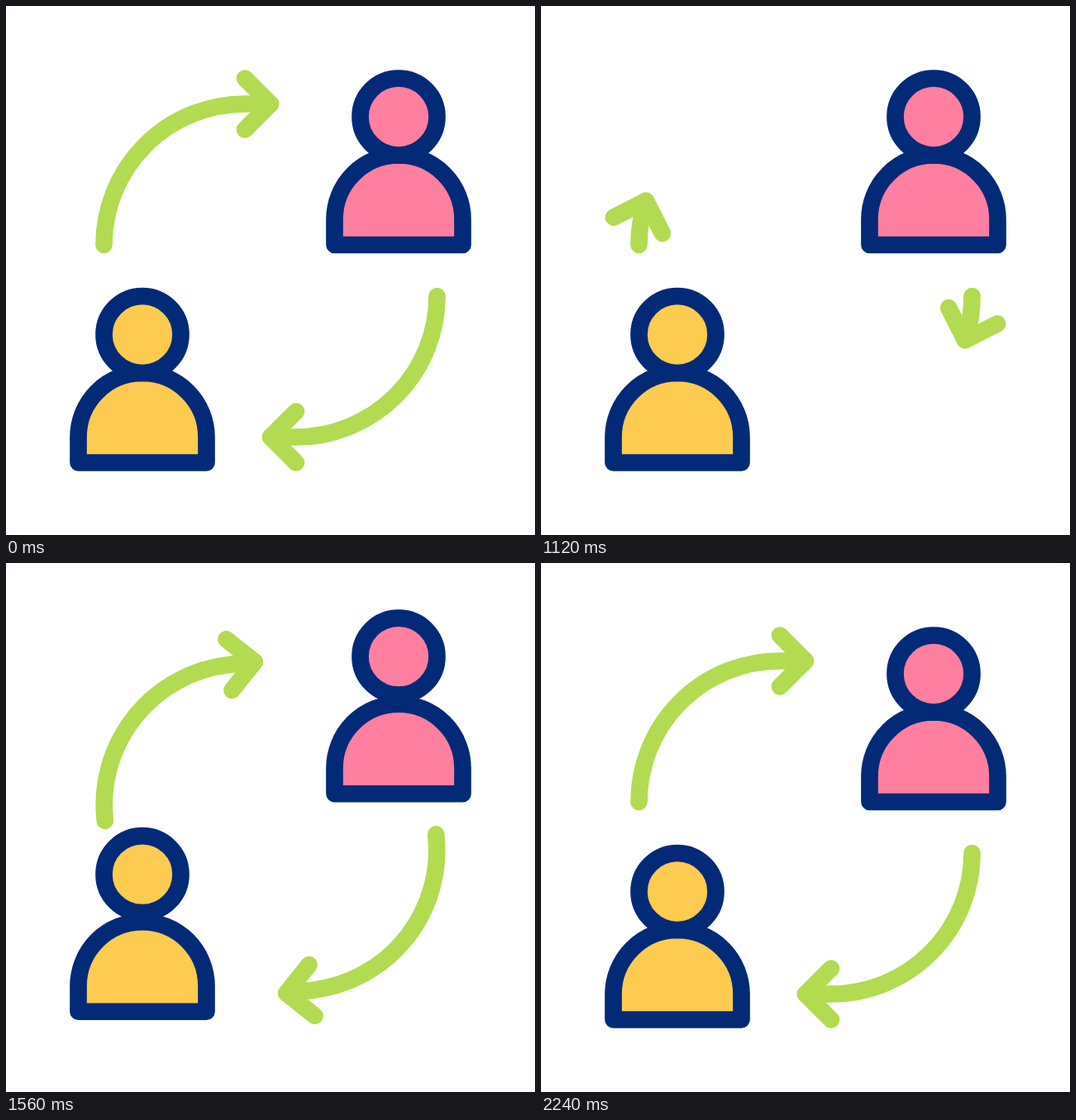
Write an HTML page with a canvas that moves like this. It is 640 by 640 pixels and loops after 2440 ms.

```html
<!DOCTYPE html>
<html lang="en">
<head>
<meta charset="utf-8">
<title>Two people swapping places</title>
<style>
  html, body { margin: 0; width: 100%; height: 100%; overflow: hidden; background: #fff; }
  canvas { display: block; width: 640px; height: 640px; }
</style>
</head>
<body>
<canvas id="stage" width="640" height="640"></canvas>
<script>
const ctx = document.getElementById('stage').getContext('2d');
const LOOP = 2440, STEP = 40;
const UNIT = 31 / 30;                 // pixels per drawing unit, origin at the centre
const RADIUS = 165, ARC = RADIUS * Math.PI / 2, LENGTH = ARC + 30;
const HEAD = 60 * Math.SQRT2;
const NAVY = '#032a77', PINK = '#ff7fa0', YELLOW = '#fdcb50', GREEN = '#b2db51';

// Keys are [time, value] pairs
const GROW = [[760, 0], [1120, .181], [1320, .575], [1440, .917], [1520, 1]];
const SWING = [[1440, 0], [1640, -10], [1720, -8.2], [1880, -1.2], [1960, .3], [2060, .6], [2240, 0]];
const LIFT = [[1280, 0], [1440, 5], [1600, 10], [1720, 10], [1880, 4.3], [1920, 3.1], [1960, 2.2], [2100, 0]];
const HOP = [[1440, 0], [1620, 14.5], [1720, 8], [1840, 0]];

const clamp = x => Math.min(1, Math.max(0, x));

// Smooth monotone curve through the keys, held outside them
function track(keys, t) {
  const last = keys.length - 1;
  if (t <= keys[0][0]) return keys[0][1];
  if (t >= keys[last][0]) return keys[last][1];
  const i = keys.findIndex(k => k[0] > t) - 1;
  const slope = j => (keys[j + 1][1] - keys[j][1]) / (keys[j + 1][0] - keys[j][0]);
  const tangent = j => {
    if (j === 0 || j === last) return 0;
    const a = slope(j - 1), b = slope(j);
    return a * b <= 0 ? 0 : 2 * a * b / (a + b);
  };
  const [t0, v0] = keys[i], [t1, v1] = keys[i + 1];
  const d = t1 - t0, s = (t - t0) / d, r = 1 - s;
  return v0 * (1 + 2 * s) * r * r + v1 * (3 - 2 * s) * s * s
    + d * s * r * (tangent(i) * r - tangent(i + 1) * s);
}

function person(x, y, fill, lift, hop) {
  ctx.save();
  ctx.translate(x, y - lift);
  ctx.strokeStyle = NAVY;
  ctx.fillStyle = fill;
  ctx.beginPath();
  ctx.moveTo(-75, 150);
  ctx.arc(0, 120, 75, Math.PI, 0);
  ctx.lineTo(75, 150);
  ctx.closePath();
  ctx.fill();
  ctx.stroke();
  ctx.beginPath();
  ctx.arc(0, -hop, 45, 0, 2 * Math.PI);
  ctx.fill();
  ctx.stroke();
  ctx.restore();
}

// Shaft between lengths from and to, with the given share of the head
function arrow(from, to, head, swing) {
  ctx.save();
  ctx.strokeStyle = GREEN;
  ctx.translate(0, -30);
  ctx.rotate(swing * Math.PI / 180);
  ctx.translate(-30, 0);

  const bend = Math.min(to, ARC) / RADIUS, run = Math.max(0, to - ARC);
  ctx.beginPath();
  if (from < ARC) ctx.arc(0, 0, RADIUS, Math.PI + from / RADIUS, Math.PI + bend);
  else ctx.moveTo(from - ARC, -RADIUS);
  if (run) ctx.lineTo(run, -RADIUS);
  ctx.stroke();

  ctx.translate(run - RADIUS * Math.cos(bend), -RADIUS * Math.sin(bend));
  ctx.rotate(bend - Math.PI / 2);
  if (head < 1) ctx.setLineDash([HEAD * head, HEAD * 2]);
  ctx.beginPath();
  ctx.moveTo(-30, -30);
  ctx.lineTo(0, 0);
  ctx.lineTo(-30, 30);
  ctx.stroke();
  ctx.restore();
}

function draw(t) {
  ctx.setTransform(1, 0, 0, 1, 0, 0);
  ctx.fillStyle = '#fff';
  ctx.fillRect(0, 0, 640, 640);
  ctx.setTransform(UNIT, 0, 0, UNIT, 320, 320);
  ctx.lineWidth = 20;
  ctx.lineCap = ctx.lineJoin = 'round';

  const gone = clamp((t - 120) / 480);
  const swing = track(SWING, t);
  if (t < 600 || t > 760) {
    for (let side = 0; side < 2; side++) {
      if (t < 600) arrow(LENGTH * gone ** 1.5, LENGTH, 1 - gone, 0);
      else arrow(0, LENGTH * track(GROW, t), 1, swing);
      ctx.rotate(Math.PI);
    }
  }

  const lift = track(LIFT, t), hop = track(HOP, t);
  person(150, -180, PINK, lift, hop);
  person(-150, 75, YELLOW, lift, hop);
}

const start = performance.now();
function tick() {
  const t = (performance.now() - start) % LOOP;
  draw(Math.floor(t / STEP) * STEP);
  requestAnimationFrame(tick);
}
tick();
</script>
</body>
</html>
```
